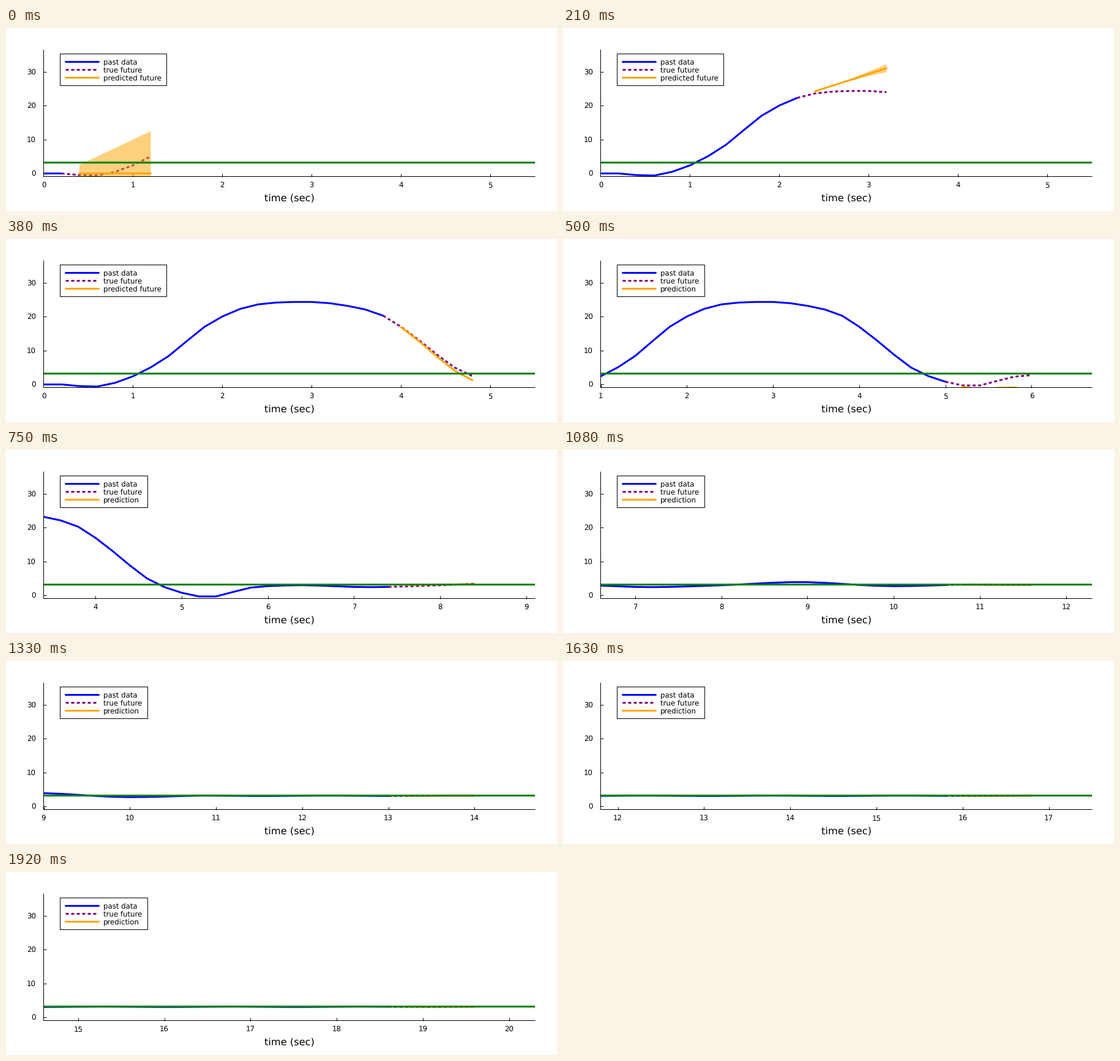
Animation, 900 px wide and 300 px high, one loop 1960 ms. Source, as a matplotlib script:

```python
import math

import matplotlib.pyplot as plt
import numpy as np
from matplotlib.animation import FuncAnimation
from matplotlib.patches import Rectangle

plt.rcParams.update({
    "font.family": "DejaVu Sans",
    "font.size": 8.5,
    "text.hinting": "none",
    "path.snap": False,
    "axes.linewidth": 0.72,
})

W, H, PX = 900, 300, 0.72      # stage in pixels, points per pixel
LOOP, TICK = 1960, 10          # ms
STEP_MS = 125 / 3              # 24 plots per second
DT, LEVEL = 0.2, 3.2
DASH = (0, (1.67, 1.33))
AHEAD = np.arange(1, 6)        # forecast horizon in samples

# Key points of the signal: launch, plateau, fall, settling.
KEYS = np.array([
    (0, 0), (.2, 0), (.6, -.62), (1, 2.4), (1.4, 8.4), (1.8, 17), (2.2, 22.3),
    (2.8, 24.35), (3.4, 23.2), (3.8, 20.3), (4.2, 13.1), (4.6, 5), (5, .8),
    (5.3, -.5), (5.8, 2.3), (6.2, 2.95), (7.2, 2.45), (8, 3), (8.9, 3.95),
    (9.95, 2.75), (10.8, 3.2),
])


def smooth(t):
    """Cubic Hermite curve through the key points."""
    kt, kv = KEYS.T
    slope = np.gradient(kv, kt)
    i = np.clip(np.searchsorted(kt, t, side="right") - 1, 0, len(kt) - 2)
    h = kt[i + 1] - kt[i]
    u = np.clip((t - kt[i]) / h, 0, 1)
    ease = u * u * (3 - 2 * u)
    bend = h * u * (1 - u) * (slope[i] * (1 - u) - slope[i + 1] * u)
    return kv[i] + (kv[i + 1] - kv[i]) * ease + bend


time = np.arange(100) * DT
ripple = LEVEL - .06 + .06 * np.cos(4.2 * (time - 10.8))
signal = np.where(time < 10.8, smooth(time), ripple)


def forecast(step, truth):
    """Zero before any learning, then a swinging error that dies out."""
    if step == 0:
        return np.zeros(len(AHEAD))
    swing = math.exp(-(step / 16) ** 2) * math.cos(math.pi * (step - 5) / 7)
    drift = .695 * swing * AHEAD ** 1.5
    calm = .92 * min(max((step - 12) / 6, 0), 1)
    return (1 - calm) * (truth + drift) + calm * (LEVEL - .05)


def spread(step):
    if step == 0:
        return 2.5 * AHEAD
    return 1.2 * .5 ** (step - 1) * (AHEAD - 1) ** 2


LEFT, TOP, WIDTH, HEIGHT = 61.5, 36, 802.5, 207.5
fig = plt.figure(figsize=(W / 100, H / 100), dpi=100, facecolor="white")
ax = fig.add_axes([LEFT / W, 1 - (TOP + HEIGHT) / H, WIDTH / W, HEIGHT / H])
ax.spines[["top", "right"]].set_visible(False)
ax.set_ylim(-.915, 36.45)
ax.set_yticks([0, 10, 20, 30])
ax.tick_params(direction="in", length=5 * PX, width=PX)
ax.tick_params(axis="x", pad=6.3)
ax.tick_params(axis="y", pad=9.1)
fig.text((LEFT + WIDTH / 2) / W, 1 - 283.4 / H, "time (sec)", size=11.7, ha="center")

thick = dict(lw=3 * PX, solid_capstyle="round", dash_capstyle="butt")
past, = ax.plot([], [], color="blue", **thick)
future, = ax.plot([], [], color="purple", ls=DASH, **thick)
band, = ax.fill([0, 0, 0], [0, 0, 0], color="orange", alpha=.5, lw=0, zorder=2.1)
guess, = ax.plot([], [], color="orange", zorder=2.2, **thick)
ax.axhline(LEVEL, color="green", zorder=2.3, **thick)

# Legend, laid out in stage pixels.
key = fig.add_axes([0, 0, 1, 1], zorder=5)
key.set(xlim=(0, W), ylim=(H, 0))
key.axis("off")
frame = key.add_patch(Rectangle((88.5, 42.5), 174, 52, fc="white", ec="black", lw=PX))
labels = []
for row, (name, color, style) in enumerate([
    ("past data", "blue", "-"),
    ("true future", "purple", DASH),
    ("predicted future", "orange", "-"),
]):
    y = 55.5 + 13 * row
    key.plot([97.5, 151.5], [y, y], color=color, ls=style, **thick)
    labels.append(key.text(159.35, y + 4.3, name))


def draw(tick):
    step = int((tick * TICK + 4.9) / STEP_MS)
    now = 2 * step + 1
    t = round(now * DT, 1)
    late = t > 4

    lo, hi = round(max(0, t - 4), 1), round(max(5.5, t + 1.7), 1)
    ax.set_xlim(lo, hi)
    ax.set_xticks(range(math.ceil(lo), math.floor(hi) + 1))

    past.set_data(time[:now + 1], signal[:now + 1])
    future.set_data(time[now:now + 6], signal[now:now + 6])

    x, y, s = time[now + AHEAD], forecast(step, signal[now + AHEAD]), spread(step)
    guess.set_data(x, y)
    band.set_xy(np.column_stack([np.r_[x, x[::-1]], np.r_[y + s, (y - s)[::-1]]]))
    band.set_visible(not late)

    labels[2].set_text("prediction" if late else "predicted future")
    frame.set_width(143 if late else 174)
    return past, future, band, guess, labels[2], frame


anim = FuncAnimation(fig, draw, frames=LOOP // TICK, interval=TICK,
                     repeat=True, repeat_delay=0, blit=False)
plt.show()
```
